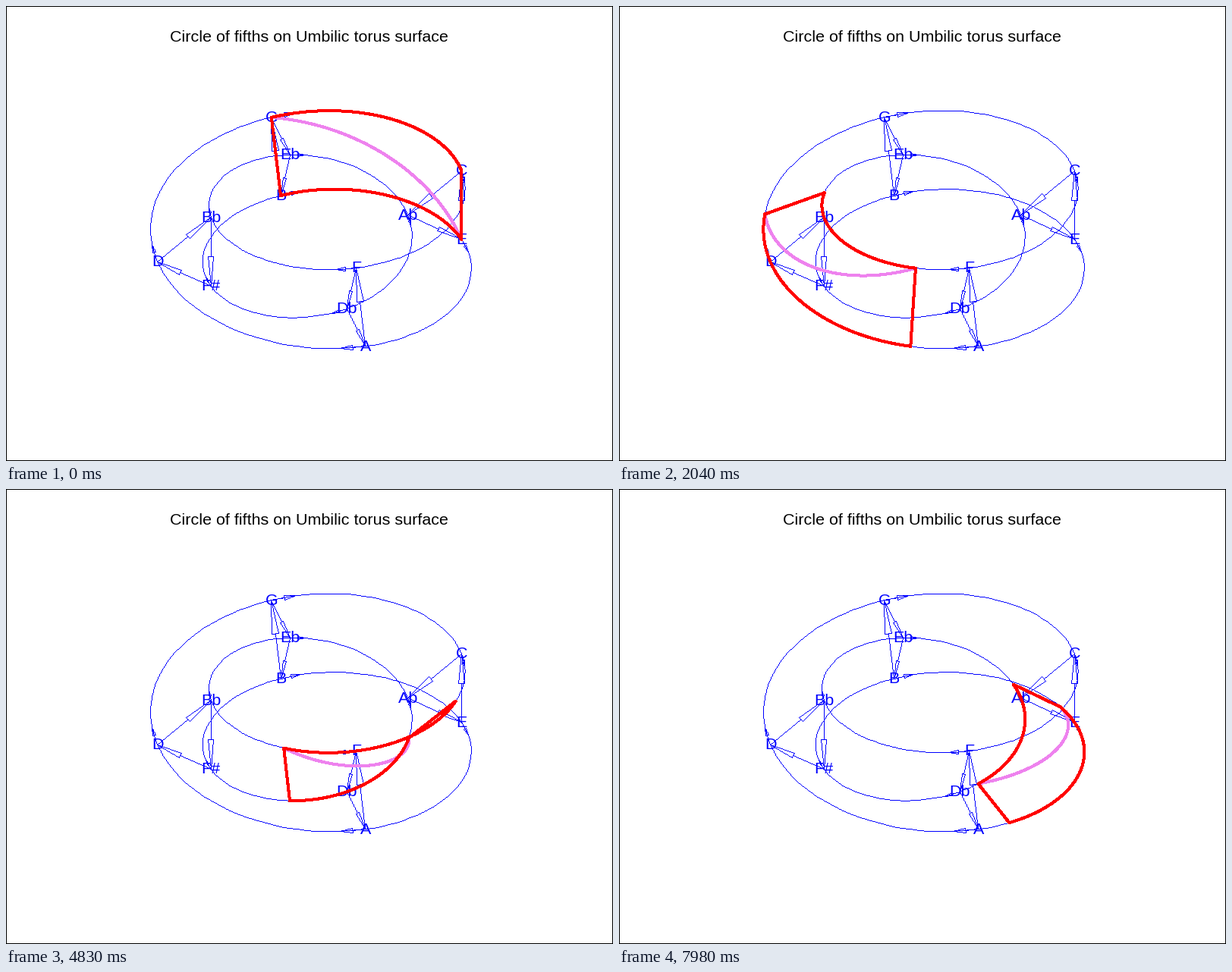
A matplotlib script for the animation above (8 s loop, 800x600 px).

```python
import numpy as np
import matplotlib.pyplot as plt
from matplotlib.animation import FuncAnimation

W, H, DPI = 800, 600, 100
PX = 72 / DPI                      # points per pixel
FRAMES, INTERVAL = 400, 20
STEP_MS, STEP_DEG = 30, 3

CENTRE = np.array([411.8, 297.8])
AXIS_X = np.array([165.1, -30.8])  # torus radius along each ground axis, on screen
AXIS_Y = np.array([-49.7, -100.0])
AXIS_Z = np.array([0.0, -52.3])
TUBE = 2 / 7
NOTES = ["C", "G", "D", "A", "E", "B", "F#", "Db", "Ab", "Eb", "Bb", "F"]
BLUE, BLACK = (0, 0, 255, 255), (0, 0, 0, 255)

plt.rcParams["font.family"] = "Liberation Sans"
FONT = 21.5 * PX


def edge(u):
    """Screen points of the torus edge, which closes after three turns (degrees)."""
    u = np.atleast_1d(np.asarray(u, float))[:, None]
    turn, twist = np.radians(u), np.radians(60 - u / 3)
    radius = 1 + TUBE * np.cos(twist)
    flat = np.cos(turn) * AXIS_X + np.sin(turn) * AXIS_Y
    return CENTRE + radius * flat + np.sin(twist) * AXIS_Z


def hairline(canvas, points, color):
    """Draw a polyline one pixel wide, without smoothing."""
    cells = np.floor(points)
    for a, b in zip(cells[:-1], cells[1:]):
        count = int(np.abs(b - a).max()) + 1
        x, y = np.rint(np.linspace(a, b, count)).astype(int).T
        canvas[y, x] = color


def arrow(canvas, start, tip, head, spread):
    """Shaft plus an open triangular head; spread is half width over length."""
    back = (start - tip) * head
    base = tip + back
    side = np.array([-back[1], back[0]]) * spread
    hairline(canvas, np.array([start, base]), BLUE)
    hairline(canvas, np.array([base + side, tip, base - side, base + side]), BLUE)


fig = plt.figure(figsize=(W / DPI, H / DPI), dpi=DPI, facecolor="white")
ax = fig.add_axes([0, 0, 1, 1])
ax.set_xlim(0, W)
ax.set_ylim(H, 0)
ax.axis("off")


def label(x, y, text, color):
    ax.text(x, y, text, ha="center", va="baseline", fontsize=FONT,
            color=color, zorder=2)


def band(color, z):
    # unsmoothed strokes cover every touched pixel, so 3 shows as 4
    line, = ax.plot([], [], color=color, lw=3 * PX, antialiased=False,
                    solid_joinstyle="round", solid_capstyle="round", zorder=z)
    return line


canvas = np.zeros((H, W, 4), np.uint8)
frame = np.array([[0, 0], [W - 1, 0], [W - 1, H - 1], [0, H - 1], [0, 0]])
hairline(canvas, frame, BLACK)
hairline(canvas, edge(np.linspace(0, 1080, 361)), BLUE)

label(399.5, 47, "Circle of fifths on Umbilic torus surface", "black")
for k, name in enumerate(NOTES):
    here, ahead = edge([90 * k, 90 * k - 9])
    third = edge(90 * ((k + 8) % 12))[0]
    arrow(canvas, here, third, 0.43, 0.095)
    arrow(canvas, here, ahead, 0.48, 0.2)
    label(here[0], here[1] + 6, name, "blue")
fig.figimage(canvas, origin="upper", zorder=-1)

diagonal = band("violet", 3)
outline = band("red", 4)
t = np.linspace(0, 1, 46)


def update(n):
    step = (n * INTERVAL + INTERVAL // 2) // STEP_MS
    u = 90 * (1 - t) - STEP_DEG * step
    near, far = edge(u), edge(u + 360)
    path = near + (far - near) * t[:, None]
    loop = np.vstack([near, far[::-1], near[:1]])
    diagonal.set_data(path[:, 0], path[:, 1])
    outline.set_data(loop[:, 0], loop[:, 1])
    return diagonal, outline


anim = FuncAnimation(fig, update, frames=FRAMES, interval=INTERVAL,
                     init_func=lambda: update(0), repeat=True, repeat_delay=0)
plt.show()
```
